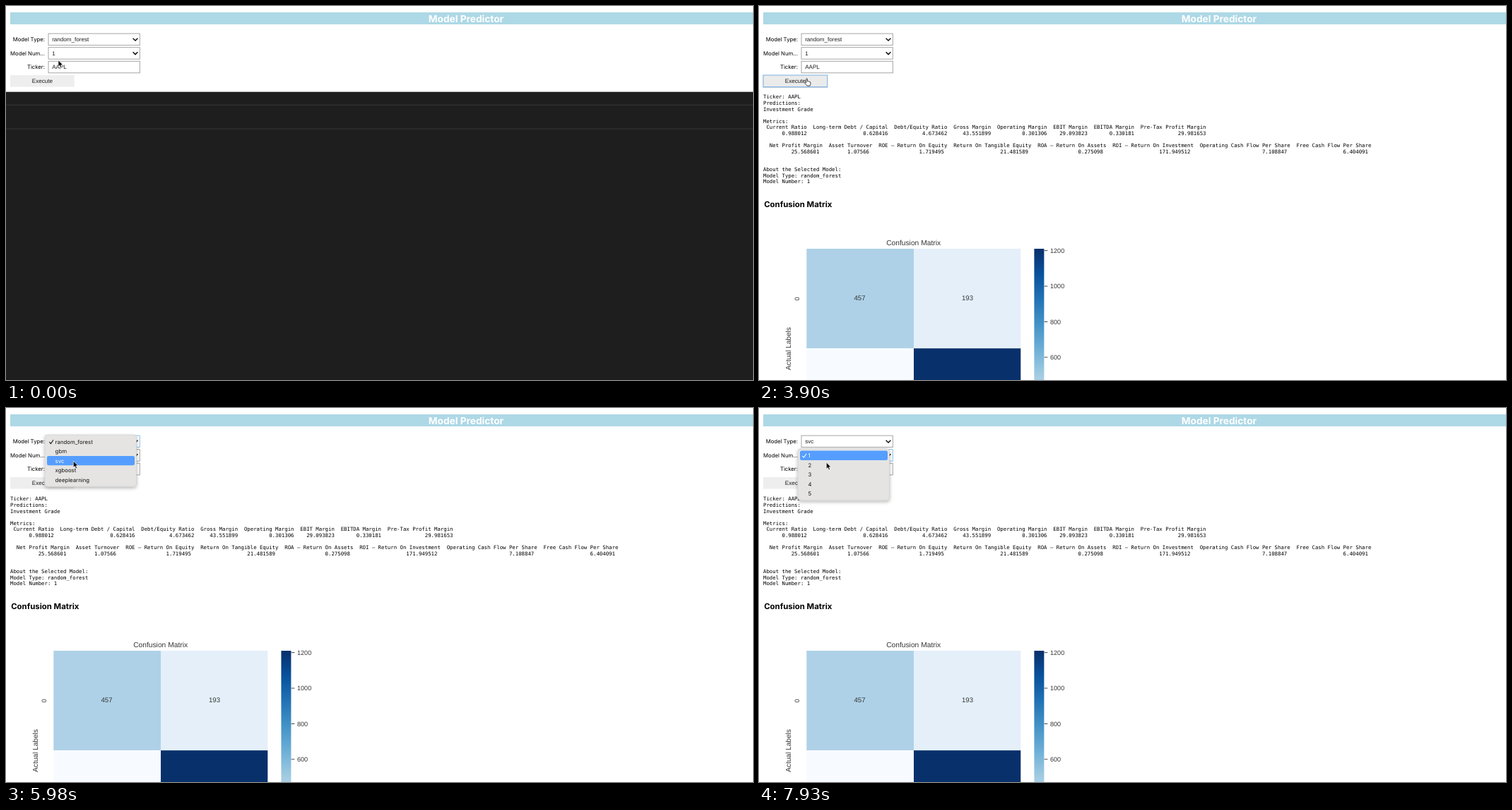
Animation of 1057 by 530 pixels, one loop 8 s. Source, as an HTML page:

```html
<!DOCTYPE html>
<html lang="en">
<head>
<meta charset="utf-8">
<title>Model Predictor</title>
<style>
html, body { margin: 0; width: 100%; height: 100%; overflow: hidden; background: #fff; }
svg { display: block; width: 100%; height: 100%; }
text { text-rendering: geometricPrecision; }
.label, .menu { font-family: Inter, "Open Sans", sans-serif; }
.label { font-size: 7.75px; text-anchor: end; }
.menu { font-size: 7.8px; fill: #151515; }
.head { font-family: Inter, "Open Sans", sans-serif; font-weight: 700; }
.ctl, .plot { font-family: "Liberation Sans", Arial, sans-serif; }
.ctl { font-size: 8.07px; fill: #1c1c1c; }
.plot { fill: #363636; }
.mid { text-anchor: middle; }
.mono { font: 7.333px "DejaVu Sans Mono", Menlo, monospace; }
</style>
</head>
<body>
<svg id="stage" viewBox="0 0 1057 530" preserveAspectRatio="none">
  <defs>
    <linearGradient id="blues" x1="0" y1="0" x2="0" y2="1"></linearGradient>
    <filter id="soft" x="-20%" y="-20%" width="140%" height="150%">
      <feDropShadow dx="0" dy="2" stdDeviation="2.4" flood-opacity=".3"/>
    </filter>
    <filter id="lift" x="-10%" y="-30%" width="120%" height="170%">
      <feDropShadow dx="0" dy=".8" stdDeviation=".7" flood-opacity=".3"/>
    </filter>
  </defs>
</svg>
<script>
const LOOP = 8000;
const stage = document.getElementById('stage');

function el(tag, attrs, parent = stage, text) {
  const node = document.createElementNS('http://www.w3.org/2000/svg', tag);
  for (const key in attrs) node.setAttribute(key, attrs[key]);
  if (text !== undefined) node.textContent = text;
  parent.appendChild(node);
  return node;
}
const rect = (x, y, width, height, fill, parent, more) =>
  el('rect', { x, y, width, height, fill, ...more }, parent);
const write = (text, x, y, cls, parent, more) =>
  el('text', { x, y, class: cls, ...more }, parent, text);
const show = (node, on) => node.setAttribute('visibility', on ? 'visible' : 'hidden');

// Header and form
rect(6, 9, 1051, 17, '#add8e6');
write('Model Predictor', 651, 23.1, 'head mid', stage, { 'font-size': 13.7, fill: '#fff' });

const ROW = 19.6;
const fields = ['Model Type:', 'Model Num…', 'Ticker:'].map((label, i) => {
  const y = i * ROW;
  write(label, 55, 50.2 + y, 'label');
  const box = rect(60, 39.1 + y, 129.3, 16.5, '#fff', stage, { 'stroke-width': 0.9 });
  const value = write(['random_forest', '1', 'AAPL'][i], 65.2, 50.2 + y, 'ctl');
  if (i < 2) {
    el('path', { d: `M179.6 ${45.7 + y}l3.4 3.3l3.4 -3.3`, fill: 'none', stroke: '#111', 'stroke-width': 1.5 });
  }
  return { box, value };
});

const button = rect(6, 98, 90.7, 16.6, '#eee');
write('Execute', 51.4, 109.1, 'ctl mid');

// Empty notebook area
const dark = el('g', {});
rect(0, 121.7, 1057, 409, '#1e1e1e', dark);
rect(0, 139.8, 1057, 0.8, '#3c3c3c', dark);
rect(0, 173.6, 1057, 0.8, '#3c3c3c', dark);

// Printed results
const result = el('g', {});
const headers = [
  [' Current Ratio', 'Long-term Debt / Capital', 'Debt/Equity Ratio', 'Gross Margin',
    'Operating Margin', 'EBIT Margin', 'EBITDA Margin', 'Pre-Tax Profit Margin'],
  ['  Net Profit Margin', 'Asset Turnover', 'ROE – Return On Equity', 'Return On Tangible Equity',
    'ROA – Return On Assets', 'ROI – Return On Investment', 'Operating Cash Flow Per Share',
    'Free Cash Flow Per Share']
];
const values = [
  '0.988012 0.628416 4.673462 43.551899 0.301306 29.093823 0.330181 29.981653',
  '25.568601 1.07566 1.719495 21.481589 0.275098 171.949512 7.108847 6.404091'
];
const valueRow = n => values[n].split(' ')
  .map((v, i) => v.padStart(headers[n][i].length)).join('  ').slice(n);

[
  'Ticker: AAPL', 'Predictions:', 'Investment Grade', '', 'Metrics:',
  headers[0].join('  '), valueRow(0), '',
  headers[1].join('  '), valueRow(1), '', '',
  'About the Selected Model:', 'Model Type: random_forest', 'Model Number: 1'
].forEach((line, i) => write(line.replace(/ /g, '\u00a0'), 6, 131.4 + i * 8.57, 'mono', result));

write('Confusion Matrix', 7.2, 284.6, 'head', result, { 'font-size': 11.4 });

// Heat map and colour bar
write('Confusion Matrix', 218.6, 339.2, 'plot mid', result, { 'font-size': 10.26 });
rect(67.3, 344, 151.7, 141.2, '#aed1e7', result);
rect(219, 344, 151.3, 141.2, '#e4eff9', result);
rect(67.3, 485.2, 151.7, 141, '#f7fbff', result);
rect(219, 485.2, 151.3, 141, '#08306b', result);
write('457', 142.5, 417, 'plot mid', result, { 'font-size': 9.6 });
write('193', 295, 417, 'plot mid', result, { 'font-size': 9.6 });
write('0', 0, 0, 'plot mid', result, { 'font-size': 9.2, transform: 'translate(57.2 415)rotate(-90)' });
write('Actual Labels', 0, 0, 'plot mid', result,
  { 'font-size': 10.15, transform: 'translate(45.2 485.5)rotate(-90)' });

'08306b 08519c 2171b5 4292c6 6baed6 9ecae1 c6dbef deebf7 f7fbff'.split(' ').forEach((c, i) =>
  el('stop', { offset: i / 8, 'stop-color': '#' + c }, document.getElementById('blues')));
rect(389.4, 344, 14, 282, 'url(#blues)', result);
for (let i = 0; i < 4; i++) {
  const y = 346.6 + i * 50.4;
  rect(403.6, y - 0.4, 4.8, 0.9, '#363636', result);
  write(1200 - i * 200, 412, y + 3.3, 'plot', result, { 'font-size': 9.1 });
}

// Popup menus
function makeMenu(items, y) {
  const group = el('g', { transform: `translate(0 ${y})` });
  rect(55, 38, 129.6, 73.2, '#e5e4e3', group,
    { rx: 4, stroke: '#c4c4c4', 'stroke-width': 0.5, filter: 'url(#soft)' });
  const bar = rect(58, 41, 124, 13.4, '#559eff', group, { rx: 2.2 });
  const tick = el('path', { d: 'M61.4 48.2l2 2.4l3.6 -5.4', fill: 'none', 'stroke-width': 1.1 }, group);
  const rows = items.map((item, i) => write(item, 69.6, 50.7 + i * 13.45, 'menu', group));
  return choice => {
    show(group, choice >= 0);
    if (choice < 0) return;
    bar.setAttribute('y', 41 + choice * 13.45);
    tick.setAttribute('stroke', choice ? '#151515' : '#fff');
    rows.forEach((row, i) => row.style.fill = i === choice ? '#fff' : '');
  };
}
const typeMenu = makeMenu(['random_forest', 'gbm', 'svc', 'xgboost', 'deeplearning'], 0);
const numberMenu = makeMenu(['1', '2', '3', '4', '5'], ROW);

// Pointers
const arrow = el('path', {
  d: 'M0 0V9.3L2.1 7.4L3.6 10.8L5.2 10.1L3.8 6.8H6.6Z',
  fill: '#000', stroke: '#fff', 'stroke-width': 0.7, 'stroke-linejoin': 'round'
});
const hand = el('path', {
  d: 'M2.2 6.2V1.2a.9 .9 0 0 1 1.8 0V4.2q1.2-.6 1.7 .3q1-.4 1.5 .4q1.2-.1 1.2 1V8q-.1 1.4-.9 2.6H3.7Q2 8.8 .4 6.7Q.3 5.3 2.2 6.2Z',
  fill: '#fff', stroke: '#111', 'stroke-width': 0.8, 'stroke-linejoin': 'round'
});

// time, x, y of the pointer tip
const path = [
  [0, 74, 76.8], [150, 74, 79], [300, 73, 86], [450, 70.5, 95], [600, 67.5, 102.5], [750, 66.5, 104],
  [3900, 67.5, 102.5], [4050, 71, 96], [4200, 77, 85], [4350, 85, 72], [4500, 93, 60],
  [4640, 99, 51], [4790, 102, 46.5], [4940, 103, 45],
  [5680, 101.5, 52], [5830, 98, 65], [5980, 95.3, 75],
  [6730, 95.4, 74], [6880, 95.7, 72], [7030, 96, 70.5], [7180, 96, 69.7],
  [7780, 95.7, 72], [7930, 95.3, 77]
];
const typeChoice = [[0, -1], [5390, 0], [5830, 1], [5980, 2], [6580, -1]];
const numberChoice = [[0, -1], [7780, 0]];
const focus = [[0, ''], [1050, 'button'], [5390, 'type'], [7780, 'number']];
const at = (steps, t) => steps.findLast(step => step[0] <= t);

function draw() {
  const t = performance.now() % LOOP;
  const [, x, y] = at(path, t);
  const overButton = y > 97;
  const held = at(focus, t)[1];
  const pressed = t >= 1050 && t < 1200;

  show(dark, t < 2400);
  show(result, t >= 2400);
  fields[0].value.textContent = t < 6580 ? 'random_forest' : 'svc';
  ['type', 'number', 'ticker'].forEach((name, i) =>
    fields[i].box.setAttribute('stroke', held === name ? '#7fbde6' : '#9c9c9c'));

  const active = held === 'button';
  button.setAttribute('fill', pressed ? '#dcdcdc' : active ? '#ebebeb' : '#eee');
  button.setAttribute('stroke', active ? '#7db4e8' : 'none');
  button.setAttribute('filter', active || overButton ? 'url(#lift)' : 'none');

  typeMenu(at(typeChoice, t)[1]);
  numberMenu(at(numberChoice, t)[1]);

  show(arrow, !overButton);
  show(hand, overButton);
  arrow.setAttribute('transform', `translate(${x} ${y})`);
  hand.setAttribute('transform', `translate(${x - 3} ${y})`);
  requestAnimationFrame(draw);
}
draw();
</script>
</body>
</html>
```
